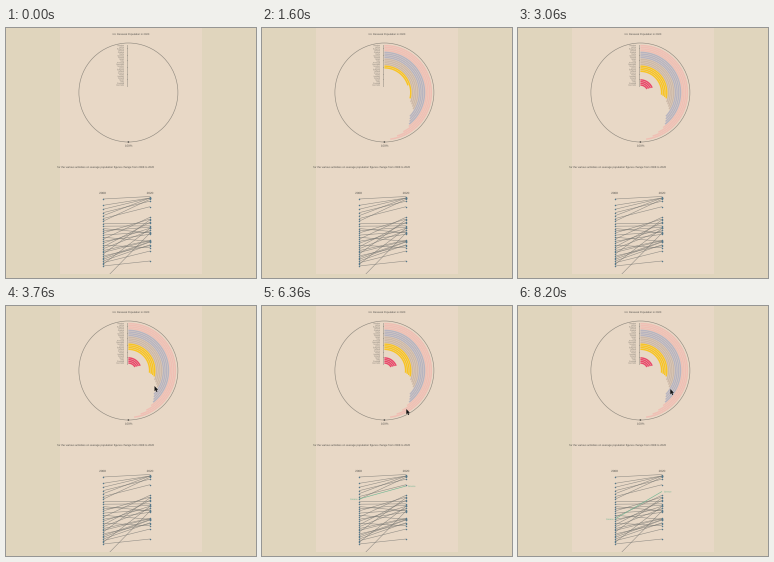
A matplotlib script that plays this animation: 250 px wide and 250 px high, repeating every 8.53 s.

```python
import numpy as np
import matplotlib.pyplot as plt
from matplotlib.animation import FuncAnimation
from matplotlib.collections import LineCollection
from matplotlib.patches import Circle, PathPatch, Polygon, Rectangle
from matplotlib.path import Path
from matplotlib.textpath import TextPath

SIZE, DPI = 250, 100
LOOP, STEP = 8530, 10
PT = 72 / DPI  # points per pixel
CX, CY, RADIUS = 122.4, 64.5, 49.5
LEFT, RIGHT = 97, 144
INK, GREEN = "#55534e", "#6fb592"

rng = np.random.default_rng(8)
fig = plt.figure(figsize=(SIZE / DPI, SIZE / DPI), dpi=DPI, facecolor="#e0d5bd")
ax = fig.add_axes([0, 0, 1, 1])
ax.set(xlim=(0, SIZE), ylim=(SIZE, 0))
ax.axis("off")

panel = Rectangle((54, 0), 142, 246, fc="#e8d8c6", lw=0)
ax.add_patch(panel)


def text_path(x, y, text, size, align=0.5):
    """Outline of text on baseline y; align is 0 left, 0.5 centre, 1 right."""
    path = TextPath((0, 0), text, size=size, prop={"family": "Liberation Sans"})
    box = path.get_extents()
    shift = x - box.x0 - align * box.width
    return Path(path.vertices * [1, -1] + [shift, y], path.codes)


def add_text(paths, color=INK, alpha=1.0):
    patch = PathPatch(Path.make_compound_path(*paths), fc=color, lw=0, alpha=alpha)
    patch.set_clip_path(panel)
    return ax.add_patch(patch)


def lines(segments, color, width):
    return ax.add_collection(LineCollection(
        segments, colors=color, linewidths=width * PT, capstyle="butt"),
        autolim=False)


# Radial chart: colour, first ring, outer and inner end angle,
# start time, delay per ring, growing time
GROUPS = [
    ("#f0bfb4", 0, 173, 147, 1260, 20, 380),
    ("#b7b4c0", 4, 142, 133, 400, 60, 640),
    ("#cdb9a8", 8, 120, 110, 400, 60, 640),
    ("#f8c424", 12, 103, 96, 1260, 210, 370),
    ("#e8486a", 20, 68, 62, 2430, 60, 440),
]
PER_GROUP, RINGS, RING = 4, 24, 1.72


def ring_radius(index):
    return 47 - RING * index


bars = [(ring_radius(first + i), angle, start + i * delay, duration)
        for _, first, outer, inner, start, delay, duration in GROUPS
        for i, angle in enumerate(np.linspace(outer, inner, PER_GROUP))]
bar_lines = lines([], np.repeat([g[0] for g in GROUPS], PER_GROUP), 1.45)

ax.add_patch(Circle((CX, CY), RADIUS, fill=False, ec="#8f897f", lw=0.6 * PT))
ax.add_patch(Circle((CX, CY + RADIUS), 0.8, fc=INK, lw=0))
lines([[(120.5, y - 0.5), (120.5, y + 0.5)]
       for y in CY - ring_radius(np.arange(RINGS))], "#8f897f", 1)

WORDS = ["Sweden", "Malta", "Portugal", "Ireland", "Spain", "Latvia",
         "Norway", "Denmark", "Greece", "Italy", "Bulgaria", "Finland"]
add_text([text_path(118, CY - ring_radius(i) + 0.6, WORDS[i * 5 % 12], 1.9, 1)
          for i in range(RINGS)], alpha=0.7)

add_text([
    text_path(125, 7, "Int. Renewal Population in 2020", 2.6),
    text_path(122.7, 118.7, "100%", 2.9),
    text_path(148, 140, "for the various activities on average population "
              "figures change from 2008 to 2020", 2.7, 1),
    text_path(96.5, 166, "2008", 3),
    text_path(144, 166, "2020", 3),
])

# Slope chart: sparse at the top, denser around the lower middle
share = np.linspace(0, 1, 30)
left = 171 + 67 * share ** 0.7
right = np.clip(172 + 52 * share + rng.normal(0, 12, share.size), 170, 233)
left, right = np.append(left, 253), np.append(right, 205)
right[0] = 168.5


def slope(start, end):
    return [(LEFT, start), (RIGHT, end)]


slope_lines = lines([slope(a, b) for a, b in zip(left, right)], "#747470", 0.55)
slope_lines.set_alpha(0.75)
slope_lines.set_clip_path(panel)
dots, = ax.plot(np.repeat([LEFT, RIGHT], left.size), np.append(left, right),
                "o", color="#55788a", ms=1.5 * PT, mew=0)
dots.set_clip_path(panel)


def highlight(start, end):
    label = add_text([text_path(95.5, start + 1, "Greece", 2.3, 1),
                      text_path(146, end + 1, "Greece", 2.3, 0)], GREEN)
    return [lines([slope(start, end)], GREEN, 0.6), label]


first_pick = highlight(193, 180)
second_pick = highlight(213, 185.5)

# Pointer
ARROW = 0.85 * np.array([(0, 0), (0, 6.2), (1.4, 5), (2.4, 7.2), (3.4, 6.7),
                         (2.5, 4.6), (4.2, 4.4)])
pointer = Polygon(ARROW, fc="#151515", lw=0, zorder=10)
ax.add_patch(pointer)
STOPS = [
    (3430, 186, 10), (3760, 148.5, 80), (4260, 149, 97), (6000, 149, 97),
    (6360, 144.3, 103), (7600, 144.3, 103), (7750, 152, 40),
    (7900, 152.3, 83), (LOOP, 152.3, 83),
]


def progress(t, start, duration):
    return min(max((t - start) / duration, 0), 1)


def pointer_position(t):
    for (t0, *a), (t1, *b) in zip(STOPS, STOPS[1:]):
        if t <= t1:
            p = progress(t, t0, t1 - t0)
            p = p * p * (3 - 2 * p)
            return np.array(a) * (1 - p) + np.array(b) * p


def arc(radius, degrees):
    a = np.radians(np.linspace(0, degrees, 50))
    return np.column_stack([CX + radius * np.sin(a), CY - radius * np.cos(a)])


def update(frame):
    t = frame * STEP
    bar_lines.set_segments([
        arc(radius, angle * (1 - (1 - progress(t, start, duration)) ** 3))
        for radius, angle, start, duration in bars])

    for artist in first_pick:
        artist.set_visible(5330 <= t < 7000)
    for artist in second_pick:
        artist.set_visible(t >= 8200)

    pointer.set_visible(t >= STOPS[0][0])
    if pointer.get_visible():
        pointer.set_xy(ARROW + pointer_position(t))
    return [bar_lines, pointer, *first_pick, *second_pick]


anim = FuncAnimation(fig, update, frames=LOOP // STEP, interval=STEP,
                     repeat=True, repeat_delay=0, blit=False)
plt.show()
```
